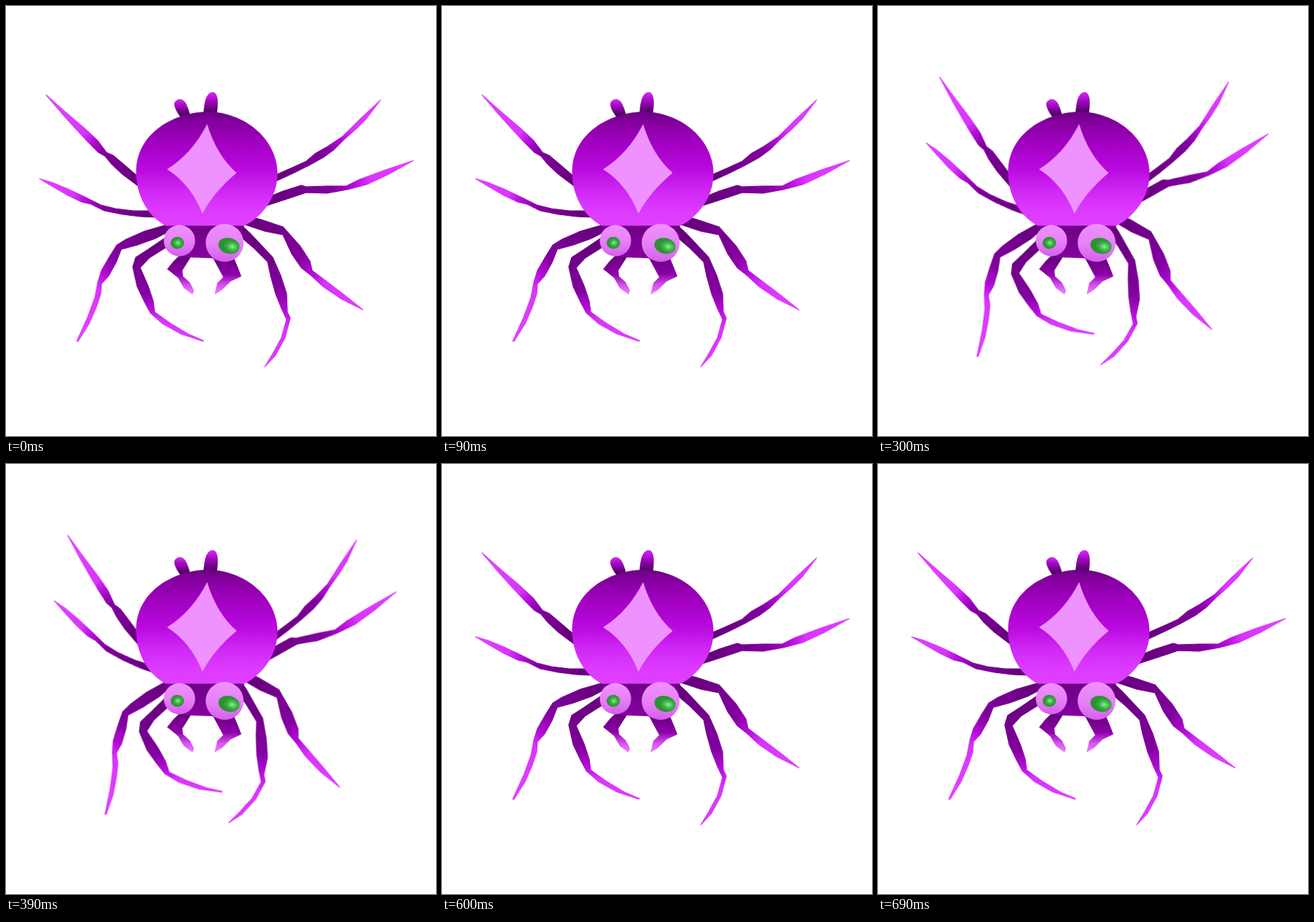
These frames come from a looping animation (590 by 590 pixels, 0.75 s). An HTML page:

```html
<!DOCTYPE html>
<html lang="en">
<head>
<meta charset="utf-8">
<title>Spider</title>
<style>
  html, body { margin: 0; width: 100%; height: 100%; overflow: hidden; background: #fff; }
  svg { display: block; width: 590px; height: 590px; }
  /* Each leg swings around its own hip: rest, --mid, --far, --mid, rest */
  .leg { animation: swing 750ms step-end infinite; }
  @keyframes swing {
    0%, 80%, 100% { transform: rotate(0deg); }
    20%, 60% { transform: rotate(var(--mid)); }
    40% { transform: rotate(var(--far)); }
  }
</style>
</head>
<body>
<svg viewBox="0 0 590 590">
  <defs>
    <linearGradient id="limb" gradientUnits="userSpaceOnUse">
      <stop offset="0" stop-color="#640079"/>
      <stop offset=".43" stop-color="#83009f"/>
      <stop offset=".57" stop-color="#b50cda"/>
      <stop offset=".68" stop-color="#d835fb"/>
      <stop offset="1" stop-color="#e040ff"/>
    </linearGradient>
    <linearGradient id="g1" href="#limb" x1="180" y1="242" x2="75" y2="141"/>
    <linearGradient id="g2" href="#limb" x1="200" y1="286" x2="45" y2="236"/>
    <linearGradient id="g3" href="#limb" x1="222" y1="303" x2="107" y2="448"/>
    <linearGradient id="g4" href="#limb" x1="215" y1="315" x2="245" y2="480"/>
    <linearGradient id="g5" href="#limb" x1="372" y1="236" x2="515" y2="128"/>
    <linearGradient id="g6" href="#limb" x1="362" y1="267" x2="560" y2="211"/>
    <linearGradient id="g7" href="#limb" x1="335" y1="292" x2="491" y2="418"/>
    <linearGradient id="g8" href="#limb" x1="328" y1="305" x2="370" y2="515"/>

    <linearGradient id="shell" x1="0" y1="0" x2="0" y2="1">
      <stop offset="0" stop-color="#6b0083"/>
      <stop offset=".1" stop-color="#8600a0"/>
      <stop offset=".25" stop-color="#9f00be"/>
      <stop offset=".5" stop-color="#b909de"/>
      <stop offset=".7" stop-color="#d028f5"/>
      <stop offset=".85" stop-color="#dc39fe"/>
      <stop offset="1" stop-color="#e040ff"/>
    </linearGradient>
    <linearGradient id="face" x1="0" y1="0" x2="0" y2="1">
      <stop offset="0" stop-color="#6c0082"/>
      <stop offset="1" stop-color="#86009f"/>
    </linearGradient>
    <linearGradient id="nub" x1="0" y1="0" x2="0" y2="1">
      <stop offset="0" stop-color="#d42cf6"/>
      <stop offset=".35" stop-color="#a808c8"/>
      <stop offset="1" stop-color="#3c004a"/>
    </linearGradient>
    <linearGradient id="fang" gradientUnits="userSpaceOnUse" x1="0" y1="345" x2="0" y2="396">
      <stop offset="0" stop-color="#690080"/>
      <stop offset=".45" stop-color="#8d00a8"/>
      <stop offset=".75" stop-color="#d850f0"/>
      <stop offset="1" stop-color="#ee88ff"/>
    </linearGradient>
    <linearGradient id="eye" x1="0" y1="0" x2="0" y2="1">
      <stop offset="0" stop-color="#ef91ff"/>
      <stop offset=".55" stop-color="#e680f6"/>
      <stop offset="1" stop-color="#d45fec"/>
    </linearGradient>
    <radialGradient id="iris" cx=".55" cy=".5" r=".55">
      <stop offset="0" stop-color="#8af09a"/>
      <stop offset=".4" stop-color="#3fb648"/>
      <stop offset=".75" stop-color="#2b9431"/>
      <stop offset="1" stop-color="#318f38"/>
    </radialGradient>
    <radialGradient id="iris2" href="#iris" cx=".66" cy=".5"/>
  </defs>

  <g stroke-width="1.2" stroke-linejoin="round">
    <path class="leg" fill="url(#g1)" stroke="url(#g1)" style="transform-origin:180px 246px;--mid:6.8deg;--far:12.5deg"
      d="M55 122 L81 145 L108 168 L126 185 L138 201 L147 205 L160 216 L188 240 V252 L160 231 L145 217 L136 206 L127 201 L113 187 L98 171 L78 149 Z"/>
    <path class="leg" fill="url(#g2)" stroke="url(#g2)" style="transform-origin:215px 278px;--mid:9.9deg;--far:17.6deg"
      d="M46 237 L63 242 L85 251 L106 261 L118 267 L130 273 L150 278 L175 281 H208 V290 L185 289 L160 286 L135 281 L117 272 L104 269 L85 260 L66 249 Z"/>
    <path class="leg" fill="url(#g3)" stroke="url(#g3)" style="transform-origin:210px 298px;--mid:-7.5deg;--far:-12.8deg"
      d="M228 298 L190 309 L165 320 L152 328 L142 344 L131 363 L126 379 L122 400 L112 427 L97 460 H99 L114 436 L124 413 L130 395 L131 381 L141 370 L151 352 L158 334 L180 328 L205 319 L228 307 Z"/>
    <path class="leg" fill="url(#g4)" stroke="url(#g4)" style="transform-origin:230px 313px;--mid:-6.4deg;--far:-10.4deg"
      d="M220 317 L195 334 L178 345 L174 358 L180 385 L190 406 L198 421 L215 436 L240 450 L270 460 L271 459 L250 450 L225 435 L204 420 L202 405 L195 384 L184 359 L196 346 L215 334 L230 325 Z"/>
    <path class="leg" fill="url(#g5)" stroke="url(#g5)" style="transform-origin:387px 263px;--mid:-8.9deg;--far:-12.8deg"
      d="M360 236 L390 223 L412 213 L425 202 L441 193 L462 179 L485 156 L514 129 L495 154 L480 169 L464 183 L450 197 L435 208 L415 219 L395 229 L358 246 Z"/>
    <path class="leg" fill="url(#g6)" stroke="url(#g6)" style="transform-origin:359px 315px;--mid:-7.1deg;--far:-11.1deg"
      d="M348 267 L380 254 L405 246 L412 248 L440 247 L467 247 L485 238 L520 225 L559 212 L525 231 L495 245 L468 252 L440 257 L412 256 L385 265 L348 277 Z"/>
    <path class="leg" fill="url(#g7)" stroke="url(#g7)" style="transform-origin:346px 279px;--mid:7.2deg;--far:12deg"
      d="M328 287 L350 293 L380 303 L387 311 L404 330 L417 350 L420 363 L440 378 L465 397 L490 417 L460 402 L435 385 L419 370 L405 359 L392 340 L380 314 L355 309 L328 300 Z"/>
    <path class="leg" fill="url(#g8)" stroke="url(#g8)" style="transform-origin:342px 290px;--mid:5.3deg;--far:13.8deg"
      d="M322 300 L335 312 L350 328 L366 345 L377 370 L385 395 L386 420 L390 428 L383 455 L370 479 L355 495 L366 477 L378 455 L385 430 L378 415 L370 395 L363 370 L359 351 L340 332 L320 315 Z"/>
  </g>

  <path fill="url(#nub)" d="M239 152 Q228 137 232 131 Q239 124 246 132 Q251 141 253 152 Z"/>
  <path fill="url(#nub)" d="M271 149 Q272 118 284 118 Q294 120 289 150 Z"/>

  <g fill="url(#fang)">
    <path d="M239 341 L230 350 L221 361 L236 373 L244 387 L256 396 L258 390 L252 379 L243 371 L242 363 L254 344 Z"/>
    <path d="M283 344 L291 359 L298 372 L290 380 L286 396 L296 390 L308 378 L323 371 L318 358 L312 344 Z"/>
  </g>
  <path fill="url(#face)" d="M217 299 H327 L322 335 Q300 352 282 346 L252 345 Q228 342 222 320 Z"/>

  <path fill="url(#shell)" d="M275 145 C330 145 372.500 185 372.500 230 C372.500 262 352 289 327 301.500 H219 C194 288 178.500 260 178.500 227 C178.500 178 225 147 275 145 Z"/>
  <path fill="#ef91ff" d="M276 162 Q289 205 316.500 229 Q286 254 269.500 285 Q254 245 221 224 Q255 203 276 162 Z"/>

  <circle cx="238" cy="322" r="21.5" fill="url(#eye)"/>
  <circle cx="300" cy="325" r="26" fill="url(#eye)"/>
  <ellipse cx="235" cy="325" rx="9.2" ry="8.200" fill="url(#iris)"/>
  <ellipse cx="306" cy="329" rx="14.8" ry="10.800" fill="url(#iris2)" transform="rotate(14 306 329)"/>
</svg>
</body>
</html>
```
